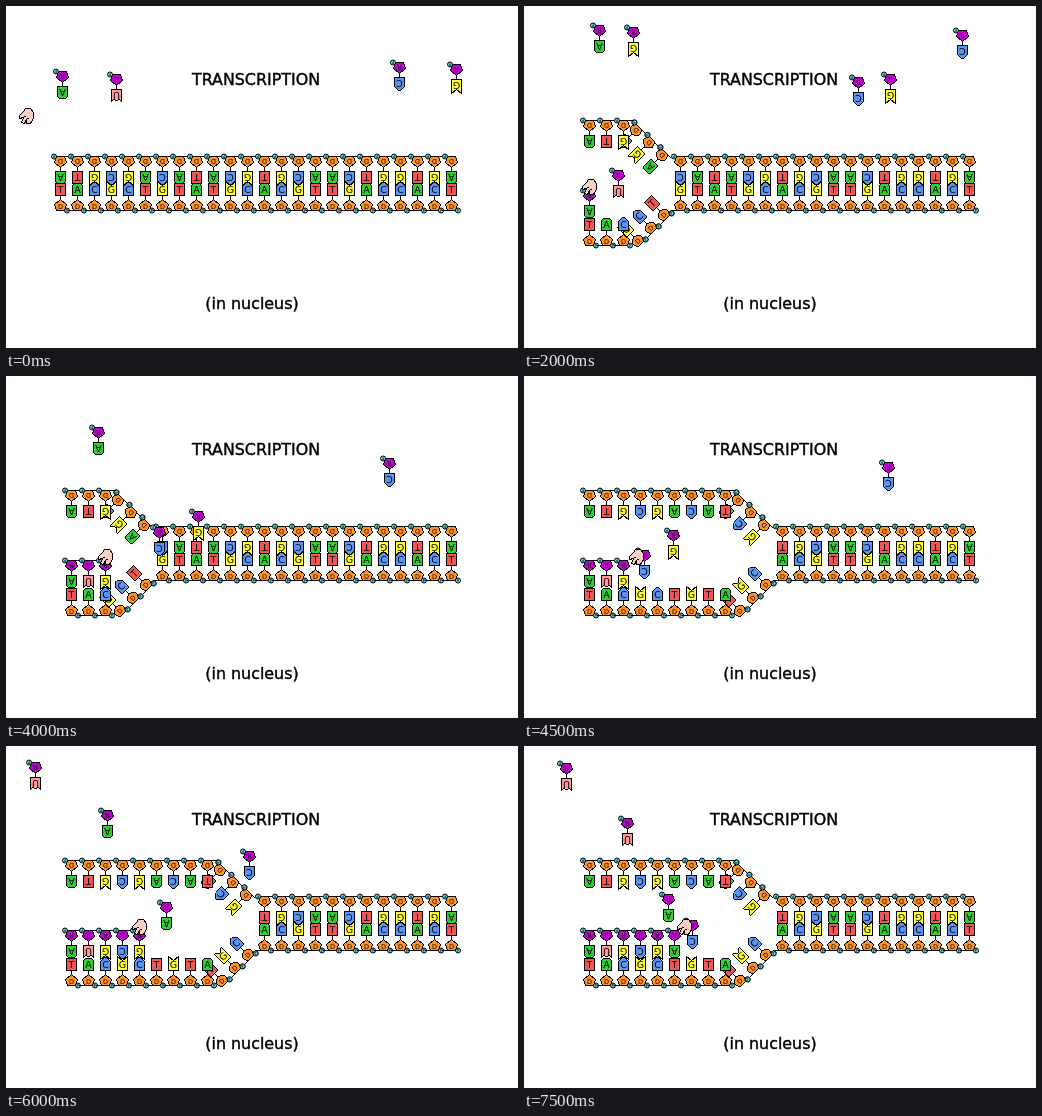
Write an HTML page that moves like this. It is 512 px wide and 342 px high and loops after 8 s.

```html
<!DOCTYPE html>
<html>
<head>
<meta charset="utf-8">
<style>
  html, body { margin: 0; width: 100%; height: 100%; overflow: hidden; background: #fff; }
  svg { display: block; width: 512px; height: 342px; }
  path, circle { stroke: #000; }
  path { shape-rendering: crispEdges; }
  text { font: 9.5px "DejaVu Sans", sans-serif; text-anchor: middle; }
  .caption { font-size: 15.9px; stroke: #000; stroke-width: .4px; }
  .sugar { font-size: 6.5px; }
  .phosphate { font-size: 4px; }
</style>
</head>
<body>
<svg viewBox="0 0 512 342">
  <text class="caption" x="250" y="79">TRANSCRIPTION</text>
  <text class="caption" x="246" y="303">(in nucleus)</text>
  <g id="scene"></g>
</svg>
<script>
const STEP = 500, LOOP = 8000, PITCH = 17;
const SEQUENCE = "ATGCGACATACGTGCAACTGGTGA";
const PARTNER = { A: "T", T: "A", C: "G", G: "C" };
const COLOR = { A: "#33cc33", T: "#f25555", U: "#ff9999", C: "#5c94f5", G: "#ffff33" };

// Pairing edge of each base, left to right; C fits into G.
const EDGE = {
  A: "V-20L-3 -22H3L5 -20",
  T: "V-22H5",
  U: "V-22L-3 -20L0 -21L3 -20L5 -22",
  C: "V-19L-1 -23H1L5 -19",
  G: "V-24L0 -20L5 -24"
};

// Drifting nucleotides: a few [step, x, y] points. Slotted ones end docked.
const FREE = [
  { base: "A", slot: 0, waits: true, path: [[1, 57, 71], [2, 30, 138], [3, 52, 180]] },
  { base: "U", slot: 1, waits: true, path: [[1, 111, 74], [2, 69, 80], [4, 95, 170]] },
  { base: "G", slot: 2, path: [[4, 110, 27], [6, 103, 173]] },
  { base: "C", slot: 3, waits: true, path: [[3, 394, 62], [4, 335, 77], [6, 221, 111], [9, 121, 180]] },
  { base: "G", slot: 4, waits: true, path: [[3, 451, 64], [4, 367, 74], [6, 280, 103], [9, 150, 160]] },
  { base: "A", slot: 5, path: [[10, 99, 26], [12, 161, 162]] },
  { base: "C", slot: 6, path: [[4, 439, 30], [6, 423, 80], [9, 365, 92], [12, 244, 111], [15, 169, 180]] },
  { base: "A", end: 9, path: [[4, 76, 25], [5, 93, 57]] },
  { base: "A", path: [[11, 72, 21], [12, 102, 70], [15, 145, 154]] },
  { base: "U", path: [[12, 30, 22], [15, 104, 78]] },
  { base: "U", path: [[15, 43, 23]] }
];
const HAND_ENTRY = [[0, 21, 111], [1, 30, 173], [2, 45, 186]];

const slotX = slot => 66 + PITCH * slot;
const dockStep = slot => 4 + 2 * slot;

for (const n of FREE) {
  if (n.slot !== undefined) n.path.push([dockStep(n.slot), slotX(n.slot), 190]);
}

function at(path, step) {
  const next = path.findIndex(point => point[0] > step);
  if (next < 0) return path[path.length - 1].slice(1);
  if (next === 0) return path[0].slice(1);
  const [s0, x0, y0] = path[next - 1], [s1, x1, y1] = path[next];
  const f = (step - s0) / (s1 - s0);
  return [Math.round(x0 + (x1 - x0) * f), Math.round(y0 + (y1 - y0) * f)];
}

// Upright: the base points up and the phosphate sits at the lower right.
function nucleotide(x, y, base, { angle = 0, rna = false, link = 3 } = {}) {
  return `<g transform="translate(${x - .5} ${y - .5}) rotate(${angle})">
    <path d="M0 -5V-10M${-link} 5H7"/>
    <path fill="${COLOR[base]}" d="M-5 -10${EDGE[base]}V-10Z"/>
    <text y="-12.5">${base}</text>
    <path fill="${rna ? "#bf00cf" : "#ff9326"}" d="M0 -6L6 -1L4 5H-4L-6 -1Z"/>
    <text class="sugar" y="3">${rna ? "R" : "D"}</text>
    <circle cx="6.5" cy="5" r="2.5" fill="#66d9e8"/>
    <text class="phosphate" x="6.5" y="6.5">P</text>
  </g>`;
}

function dna(open) {
  let fork = "", straight = "";
  [...SEQUENCE].forEach((base, i) => {
    const k = i - open, pair = PARTNER[base];
    if (open && k >= 0 && k < 3) {
      const x = slotX(open) - 5 + 13 * k;
      fork += nucleotide(x, 125 + 12.5 * k, base, { angle: 225, link: 9 })
            + nucleotide(x + 2, 235 - 13 * k, pair, { angle: -45, link: k ? 9 : 3 });
    } else {
      const apart = k < 0;
      const x = slotX(i) - (apart ? 0 : 11);
      const topLink = i < SEQUENCE.length - 1 ? 10 : 3;
      straight += nucleotide(x, apart ? 120 : 156, base, { angle: 180, link: topLink })
                + nucleotide(x, apart ? 235 : 200, pair, { link: i ? 10 : 3 });
    }
  });
  return fork + straight;
}

function rna(step) {
  return FREE.map(({ base, slot, path, waits, end = Infinity }) => {
    if (step >= end || (step < path[0][0] && !waits)) return "";
    const followed = slot !== undefined && step >= dockStep(slot + 1);
    return nucleotide(...at(path, step), base, { angle: 180, rna: true, link: followed ? 10 : 3 });
  }).join("");
}

// After its entry the hand carries one nucleotide to each slot in turn.
function hand(step) {
  let [x, y] = at(HAND_ENTRY, step);
  if (step >= 3) {
    const slot = Math.floor((step - 3) / 2);
    const held = FREE.find(n => n.slot === (step % 2 ? slot : (step - 4) / 2));
    [x, y] = at(held.path, step);
    if (step % 2) { x -= 8; y += 2; } else y -= 8;
  }
  return `<g transform="translate(${x - .5} ${y - .5})">
    <path fill="#f7cfc6" d="M-1 -8H4L7 -4V2L4 7H0V3L-2 7L-5 6L-3 1L-7 2V-1L-3 -5Z"/>
    <path d="M-3 1L0 -1M0 3L3 1" fill="none"/>
  </g>`;
}

const scene = document.getElementById("scene");
let shown = -1;

function draw(ms) {
  const step = Math.floor((ms % LOOP) / STEP);
  if (step === shown) return;
  shown = step;
  const open = step < 2 ? 0 : step < 9 ? 3 : 9;
  scene.innerHTML = dna(open) + rna(step) + hand(step);
}

const start = performance.now();
function tick() {
  draw(performance.now() - start);
  requestAnimationFrame(tick);
}
tick();
</script>
</body>
</html>
```
